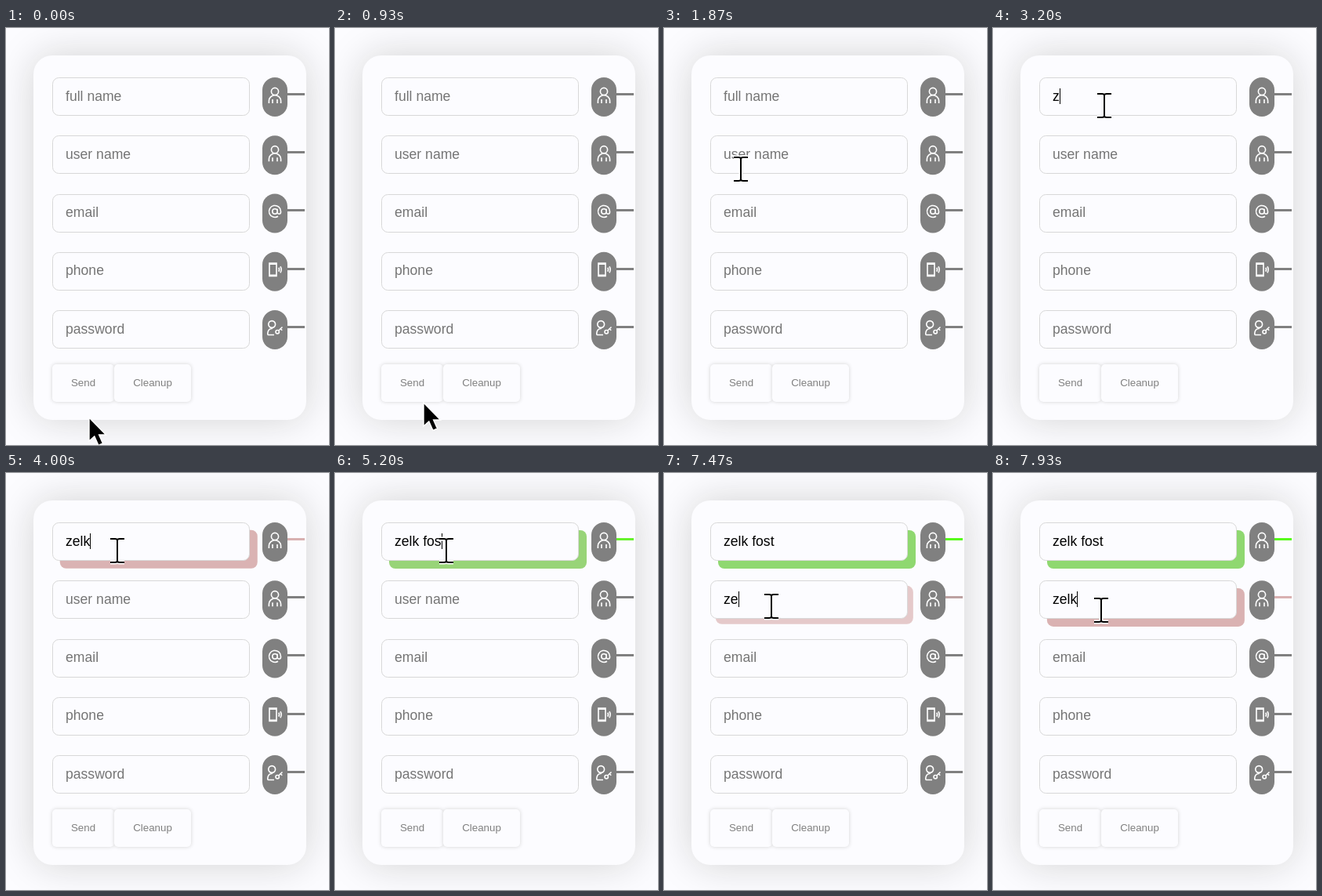
An HTML page for the animation above (8000 ms loop, 412 px wide and 532 px high).

```html
<!DOCTYPE html>
<html lang="en">
<head>
<meta charset="utf-8">
<title>Sign-up form</title>
<style>
html, body { margin: 0; width: 100%; height: 100%; overflow: hidden; background: #fcfcff; }
#card { position: absolute; left: 35px; top: 35px; width: 348px; height: 465px;
  border-radius: 24px; background: #fcfcff; box-shadow: 0 0 50px #d3d3d3; }
svg { position: absolute; left: 0; top: 0; }
text { font: 17.6px "Liberation Sans", Arial, sans-serif; fill: #757575; white-space: pre; }
.field { fill: #fcfcff; stroke: #d8d8d8; }
.pill { fill: #808080; }
.icon { fill: none; stroke: #fff; stroke-width: 1.6; }
.button { position: absolute; top: 429px; height: 48px; border-radius: 5px;
  background: #fcfcff; box-shadow: 0 0 5px #d3d3d3; color: #808080;
  font: 13.333px/48px "Liberation Sans", Arial, sans-serif; text-align: center; }
</style>
</head>
<body>
<div id="card"></div>
<div class="button" style="left:59px;width:79px">Send</div>
<div class="button" style="left:138px;width:98px">Cleanup</div>
<svg id="stage" width="412" height="532" viewBox="0 0 412 532"></svg>
<script>
const stage = document.getElementById('stage');
const LOOP = 8000, STEP = 74.25, TOP = 63.5, HEIGHT = 48;
const GRAY = [128, 128, 128], ROSE = [218, 178, 178];
const GREEN = [143, 216, 112], LIME = [88, 250, 28];

function add(tag, attrs, parent = stage) {
  const el = document.createElementNS('http://www.w3.org/2000/svg', tag);
  for (const name in attrs) el.setAttribute(name, attrs[name]);
  return parent.appendChild(el);
}

const person = 'M-4.6-4.5a4.6 4.6 0 1 0 9.2 0a4.6 4.6 0 1 0-9.2 0' +
  'M-7.6 10.5V7.5a7.6 7.2 0 0 1 15.2 0v3M-3 5.5v5M3 5.5v5';
const icons = [
  person,
  person,
  'M4 6.3A7.5 7.5 0 1 1 7.5 0V1a2.2 2.2 0 0 1-4.4 0V-3.2' +
    'M-3.2 0a3.2 3.2 0 1 0 6.4 0a3.2 3.2 0 1 0-6.4 0',
  'M-7-8.2H2V8.2H-7ZM-7-7H2M-7 7H2M4.8-2.5q1.6 2.5 0 5M7-4q2.4 4 0 8',
  'M-8.2-4.5a4.4 4.4 0 1 0 8.8 0a4.4 4.4 0 1 0-8.8 0M-9.2 9V6.5Q-8.5 1-3 .8M-9.2 9H-1' +
    'M1 5.2a2.2 2.2 0 1 0 4.4 0a2.2 2.2 0 1 0-4.4 0M4.8 3.5L9.5-1M7.2 1.2l2 2'
];

const rows = ['full name', 'user name', 'email', 'phone', 'password'].map((hint, i) => {
  const y = TOP + i * STEP;
  const shadow = add('rect', { width: 252, height: 49, rx: 8, opacity: 0 });
  add('rect', { class: 'field', x: 59.5, y: Math.floor(y) + .5, width: 251, height: HEIGHT, rx: 8 });
  const text = add('text', { x: 76, y: Math.round(y + 29.2) });
  const line = add('rect', { x: 358, y: Math.round(y + 19.3), width: 23, height: 3 });
  add('rect', { class: 'pill', x: 327, y: y - .5, width: 32, height: 50, rx: 16 });
  add('path', { class: 'icon', d: icons[i], transform: `translate(343 ${y + 22})` });
  return { y, hint, shadow, text, line };
});

const caret = add('rect', { width: 1, height: 20 });
const beamPath = 'M-9-15H-3Q0-15 0-13Q0-15 3-15H9M0-13V13M-9 15H-3Q0 15 0 13Q0 15 3 15H9';
const beam = add('g', { fill: 'none' });
add('path', { d: beamPath, stroke: '#fff', 'stroke-width': 5 }, beam);
add('path', { d: beamPath, stroke: '#000', 'stroke-width': 2 }, beam);
const arrow = add('path', {
  d: 'M0 0V30L6.8 24L12 35.5L17.5 33L12.6 22H21.5Z', stroke: '#fff', 'stroke-width': 1.4
});

// Pointer stops: time, x, y
const stops = [
  [0, 106, 497], [870, 113, 478], [930, 113, 478], [1730, 108, 448], [1870, 98, 180],
  [2400, 142, 99], [5800, 142, 99], [6500, 135, 165], [7070, 135, 165], [7870, 138, 175]
];

// start: first key, valid: check passes, keys: time of each character
const entries = [
  { value: 'zelk fost', start: 3200, valid: 4600,
    keys: [3200, 3470, 3670, 3930, 4470, 4600, 4870, 5070, 5270] },
  { value: 'zelk', start: 7070, valid: Infinity, keys: [7070, 7330, 7530, 7800] }
];

const clamp = v => Math.min(1, Math.max(0, v));
const smooth = v => v * v * (3 - 2 * v);
const mix = (a, b, k) => a.map((v, i) => v + (b[i] - v) * k);
const rgb = c => `rgb(${c.map(Math.round)})`;

// The CSS "ease" curve, cubic-bezier(.25, .1, .25, 1)
function ease(p) {
  p = clamp(p);
  let lo = 0, hi = 1, s = p;
  for (let i = 0; i < 20; i++) {
    s = (lo + hi) / 2;
    const x = .75 * s * (1 - s) ** 2 + .75 * s * s * (1 - s) + s ** 3;
    if (x < p) lo = s; else hi = s;
  }
  return .3 * s * (1 - s) ** 2 + 3 * s * s * (1 - s) + s ** 3;
}

function pointer(t) {
  const i = stops.findIndex(s => s[0] > t);
  if (i < 0) return stops[stops.length - 1].slice(1);
  const [a, b] = [stops[i - 1], stops[i]];
  return mix(a, b, smooth((t - a[0]) / (b[0] - a[0]))).slice(1);
}

function draw(t) {
  rows.forEach((row, i) => {
    const entry = entries[i];
    const typed = entry ? entry.value.slice(0, entry.keys.filter(k => k <= t).length) : '';
    const shown = entry ? ease((t - entry.start) / 1000) : 0;
    const valid = entry ? ease((t - entry.valid) / 1000) : 0;
    row.text.textContent = typed || row.hint;
    row.text.style.fill = typed ? '#000' : '';
    row.width = typed ? row.text.getComputedTextLength() : 0;
    row.shadow.setAttribute('x', 59 + 10 * shown);
    row.shadow.setAttribute('y', Math.floor(row.y) + 10 * shown);
    row.shadow.setAttribute('opacity', shown);
    row.shadow.setAttribute('fill', rgb(mix(ROSE, GREEN, valid)));
    row.line.setAttribute('fill', rgb(mix(mix(GRAY, ROSE, shown), LIME, valid)));
  });

  const active = rows[t < 6470 ? 0 : 1];
  caret.setAttribute('visibility', t >= 2870 ? 'visible' : 'hidden');
  caret.setAttribute('x', Math.round(76 + active.width));
  caret.setAttribute('y', Math.round(active.y + 13.7));

  const [x, y] = pointer(t);
  const inField = rows.some(r => y >= r.y && y <= r.y + HEIGHT);
  beam.setAttribute('visibility', inField ? 'visible' : 'hidden');
  arrow.setAttribute('visibility', inField ? 'hidden' : 'visible');
  for (const el of [beam, arrow])
    el.setAttribute('transform', `translate(${Math.round(x)} ${Math.round(y)})`);
}

let begin;
function tick(now) {
  begin ??= now;
  draw((now - begin) % LOOP);
  requestAnimationFrame(tick);
}
draw(0);
requestAnimationFrame(tick);
</script>
</body>
</html>
```
